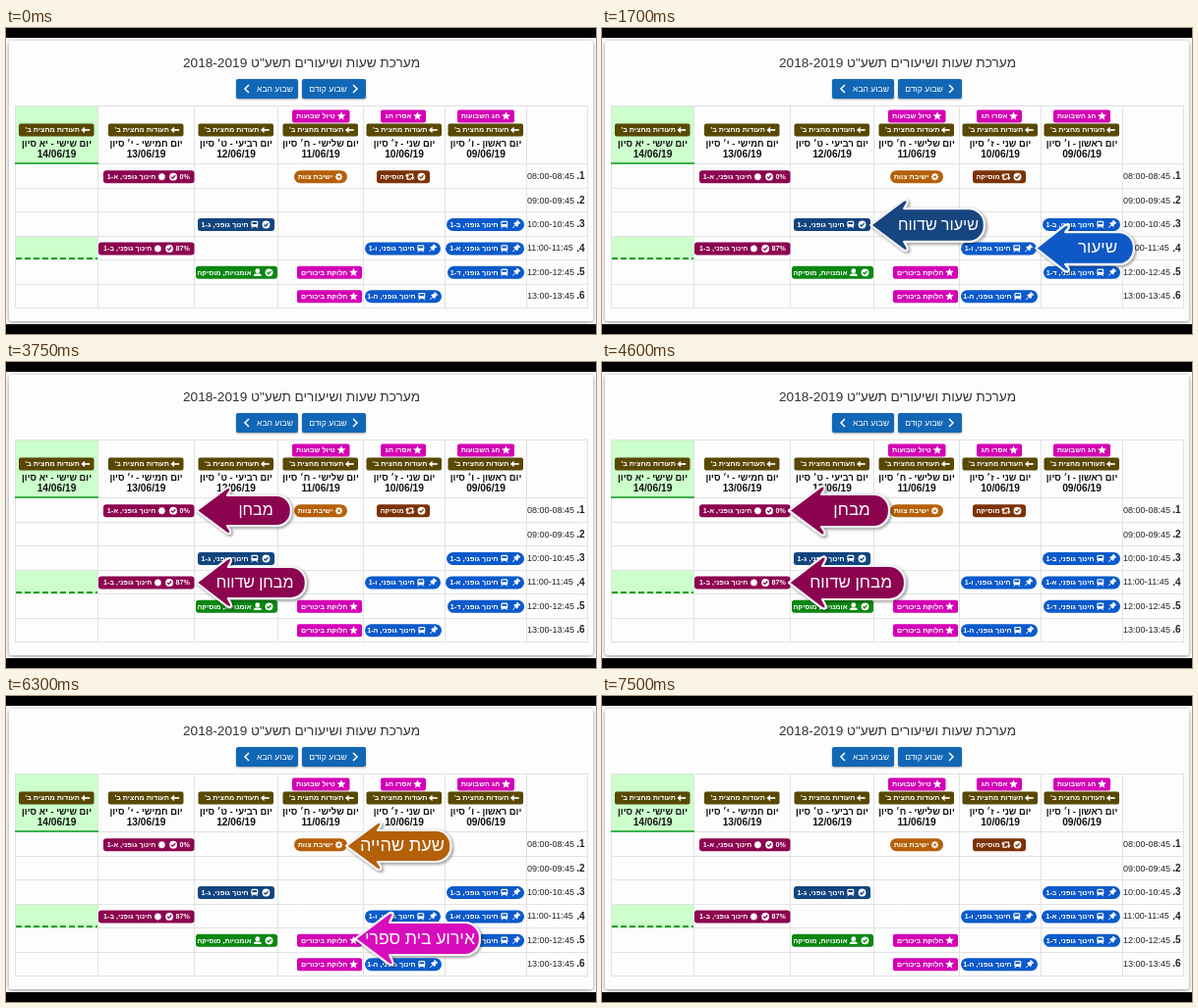
An HTML page with a canvas that plays this animation: 600 px wide and 312 px high, repeating every 8 s.

```html
<!DOCTYPE html>
<html lang="he">
<head>
<meta charset="utf-8">
<title>מערכת שעות</title>
<style>
html, body { margin: 0; width: 100%; height: 100%; overflow: hidden; background: #fff; }
canvas { display: block; width: 600px; height: 312px; }
</style>
</head>
<body>
<canvas id="stage" width="600" height="312"></canvas>
<script>
const ctx = document.getElementById('stage').getContext('2d');
const SANS = '"Liberation Sans", Arial, sans-serif';
const CALLOUT = '"Open Sans", "Liberation Sans", sans-serif';
const LOOP = 8000, STEP = 50, SHOWN = 1650, EXIT = 350;

const BLUE = '#0b5acb', NAVY = '#12457f', PLUM = '#8c0450', PINK = '#d400b5';
const OLIVE = '#594800', ORANGE = '#b56008', RUST = '#7b3206', GREEN = '#0b8712';

const columns = [9.5, 93.5, 191.5, 276.5, 363.5, 446.5, 529.5, 591.5];
const days = [
  ['יום שישי - יא סיון', '14/06/19'],
  ['יום חמישי - י׳ סיון', '13/06/19'],
  ['יום רביעי - ט׳ סיון', '12/06/19'],
  ['יום שלישי - ח׳ סיון', '11/06/19'],
  ['יום שני - ז׳ סיון', '10/06/19'],
  ['יום ראשון - ו׳ סיון', '09/06/19']
];
const hours = ['08:00-08:45', '09:00-09:45', '10:00-10:45', '11:00-11:45', '12:00-12:45', '13:00-13:45'];
const rowLine = i => Math.round(138 + 24.5 * i) + 0.5;
const rowMid = i => 151.7 + 24.4 * i;
const sport = group => 'חינוך גופני, ' + group + '-1';

// left, right, row, colour, corner radius, icons from the right, text
const lessons = [
  [99, 191.5, 0, PLUM, 3, ['0%', 'check', 'burst'], sport('א')],
  [293, 347, 0, ORANGE, 6.5, ['gear'], 'ישיבת צוות'],
  [377, 431, 0, RUST, 3, ['check', 'swap'], 'מוסיקה'],
  [195, 273, 2, NAVY, 3, ['check', 'train'], sport('ג')],
  [448, 527, 2, BLUE, 6.5, ['pin', 'train'], sport('ב')],
  [94, 191.5, 3, PLUM, 3, ['87%', 'check', 'burst'], sport('ב')],
  [365, 442, 3, BLUE, 6.5, ['pin', 'train'], sport('ו')],
  [447, 527, 3, BLUE, 6.5, ['pin', 'train'], sport('א')],
  [193, 276, 4, GREEN, 3, ['check', 'person'], 'אומנויות, מוסיקה'],
  [296, 362, 4, PINK, 2, ['star'], 'חלוקת ביכורים'],
  [449, 527, 4, BLUE, 6.5, ['pin', 'train'], sport('ד')],
  [296, 362, 5, PINK, 2, ['star'], 'חלוקת ביכורים'],
  [365, 443, 5, BLUE, 6.5, ['pin', 'train'], sport('ה')]
];

const scenes = [
  { start: 850, arrows: [
    { tip: 273, neck: 308, right: 389, y: 201, head: 26, body: 17, mid: 342, color: '#17457f', size: 16.2, text: 'שיעור שדווח' },
    { tip: 441, neck: 472, right: 541, y: 224.5, head: 24, body: 16.5, mid: 504, color: '#0f59c6', size: 17, text: 'שיעור' }
  ] },
  { start: 3350, arrows: [
    { tip: 190, neck: 224, right: 292, y: 151.5, head: 25, body: 16.5, mid: 254, color: PLUM, size: 17, text: 'מבחן' },
    { tip: 190, neck: 225, right: 308, y: 225, head: 26.5, body: 17, mid: 253, color: PLUM, size: 17, text: 'מבחן שדווח' }
  ] },
  { start: 5850, arrows: [
    { tip: 344, neck: 378, right: 454, y: 153, head: 25, body: 16.5, mid: 403, color: '#b36007', size: 18.7, text: 'שעת שהייה' },
    { tip: 353, neck: 390, right: 484, y: 247.5, head: 27.5, body: 17, mid: 421, color: '#d80bbd', size: 18.2, text: 'אירוע בית ספרי' }
  ] }
];

function text(str, x, y, font, color, align = 'center', dir = 'rtl') {
  ctx.font = font;
  ctx.fillStyle = color;
  ctx.textAlign = align;
  ctx.direction = dir;
  ctx.textBaseline = 'middle';
  ctx.fillText(str, x, y);
}

function box(x, y, w, h, r, color) {
  ctx.fillStyle = color;
  ctx.beginPath();
  ctx.roundRect(x, y, w, h, r);
  ctx.fill();
}

function line(x1, y1, x2, y2, color, width = 1) {
  ctx.strokeStyle = color;
  ctx.lineWidth = width;
  ctx.beginPath();
  ctx.moveTo(x1, y1);
  ctx.lineTo(x2, y2);
  ctx.stroke();
}

function poly(points, color, close = true) {
  ctx.beginPath();
  points.forEach(([x, y]) => ctx.lineTo(x, y));
  if (close) {
    ctx.fillStyle = color;
    ctx.fill();
  } else {
    ctx.strokeStyle = color;
    ctx.stroke();
  }
}

function dot(x, y, r, color) {
  ctx.fillStyle = color;
  ctx.beginPath();
  ctx.arc(x, y, r, 0, Math.PI * 2);
  ctx.fill();
}

function spikes(count, outer, inner) {
  return Array.from({ length: count * 2 }, (_, i) => {
    const a = i * Math.PI / count - Math.PI / 2, r = i % 2 ? inner : outer;
    return [Math.cos(a) * r, Math.sin(a) * r];
  });
}

const icons = {
  star() { poly(spikes(5, 5, 2.2), '#fff'); },
  burst() { poly(spikes(10, 4.3, 3.2), '#fff'); },
  gear(bg) { poly(spikes(8, 4.5, 3), '#fff'); dot(0, 0, 1.4, bg); },
  check(bg) {
    dot(0, 0, 4.2, '#fff');
    ctx.lineWidth = 1.4;
    poly([[-2.2, 0], [-0.6, 1.6], [2.3, -1.5]], bg, false);
  },
  train(bg) {
    box(-3.7, -4, 7.4, 6.5, 1.5, '#fff');
    box(-2.5, -2.7, 5, 2.2, 0, bg);
    ctx.lineWidth = 1;
    poly([[-3.3, 4], [-1.8, 2]], '#fff', false);
    poly([[3.3, 4], [1.8, 2]], '#fff', false);
  },
  pin() {
    ctx.rotate(Math.PI / 4);
    box(-2.4, -4.8, 4.8, 1.6, 0.5, '#fff');
    poly([[-1.4, -3.4], [1.4, -3.4], [3, 0.8], [-3, 0.8]], '#fff');
    line(0, 0, 0, 5, '#fff');
  },
  person() {
    dot(0, -1.7, 2.6, '#fff');
    box(-4.2, 1.2, 8.4, 2.8, [2, 2, 0, 0], '#fff');
  },
  swap() {
    ctx.lineWidth = 1.4;
    poly([[-3, -1], [-3, 2.7], [1.5, 2.7]], '#fff', false);
    poly([[3, 1], [3, -2.7], [-1.5, -2.7]], '#fff', false);
    poly([[-5.2, -0.6], [-3, -3.6], [-0.8, -0.6]], '#fff');
    poly([[5.2, 0.6], [3, 3.6], [0.8, 0.6]], '#fff');
  },
  left() {
    line(-3, 0, 4.5, 0, '#fff', 1.8);
    poly([[-5, 0], [-1, -3.5], [-1, 3.5]], '#fff');
  }
};

function icon(name, x, y, bg) {
  ctx.save();
  ctx.translate(x, y);
  ctx.scale(0.93, 0.93);
  icons[name](bg);
  ctx.restore();
}

function pill(left, right, y, color, radius, marks, label) {
  const font = 'bold 7.2px ' + SANS;
  box(left, y - 6.5, right - left, 13, radius, color);
  let x = right - 3;
  for (const mark of marks) {
    if (icons[mark]) {
      icon(mark, x - 5.5, y, color);
      x -= 11.7;
    } else {
      text(mark, x - 1.5, y + 0.5, font, '#fff', 'right', 'ltr');
      x -= ctx.measureText(mark).width + 2.5;
    }
  }
  text(label, x, y + 0.5, font, '#fff', 'right');
}

function button(x, width, label, textX, chevronX, dir) {
  ctx.save();
  ctx.shadowColor = 'rgba(0,0,0,.35)';
  ctx.shadowBlur = 2;
  ctx.shadowOffsetY = 1;
  box(x, 52, width, 20, 2, '#1167b5');
  ctx.restore();
  text(label, textX, 62.5, '8.6px ' + SANS, '#fff');
  ctx.lineWidth = 1.5;
  poly([[chevronX - 2 * dir, 58], [chevronX + 2 * dir, 62], [chevronX - 2 * dir, 66]], '#fff', false);
}

function drawPage() {
  ctx.fillStyle = '#fff';
  ctx.fillRect(0, 0, 600, 312);
  ctx.save();
  ctx.shadowColor = 'rgba(0,0,0,.45)';
  ctx.shadowBlur = 4;
  ctx.shadowOffsetY = 1;
  box(3, 13, 594, 286, 3, '#fdfdfd');
  ctx.restore();
  ctx.fillStyle = '#000';
  ctx.fillRect(0, 0, 600, 10);
  ctx.fillRect(0, 302, 600, 10);

  text('מערכת שעות ושיעורים תשע"ט 2018-2019', 300.5, 36.5, '13.65px ' + SANS, '#333');
  button(301, 65, 'שבוע קודם', 327.5, 355, 1);
  button(234, 63, 'שבוע הבא', 273.5, 245, -1);
}

function drawTable() {
  ctx.fillStyle = '#ccffcc';
  ctx.fillRect(10, 80, 83, 58);
  ctx.fillRect(10, rowLine(3), 83, 24);
  columns.forEach(x => line(x, 79, x, 285, '#e2e2e2'));
  line(9, 79.5, 592, 79.5, '#e2e2e2');
  for (let i = 0; i <= 6; i++) line(9, rowLine(i), 592, rowLine(i), '#e2e2e2');
  line(9, 138, 94, 138, '#3cb050', 2);
  ctx.setLineDash([6, 3]);
  line(10, 235, 93, 235, '#10a010', 2);
  ctx.setLineDash([]);

  days.forEach(([name, date], i) => {
    const mid = (columns[i] + columns[i + 1]) / 2;
    pill(mid - 38.5, mid + 38, 104, OLIVE, 2, ['left'], "תעודות מחצית ב'");
    text(name, mid, 118.5, 'bold 9.4px ' + SANS, '#111');
    text(date, mid, 129, 'bold 10.2px ' + SANS, '#111', 'center', 'ltr');
  });
  pill(291, 349.5, 90, PINK, 2, ['star'], 'טיול שבועות');
  pill(381, 427, 90, PINK, 2, ['star'], 'אסרו חג');
  pill(459, 517, 90, PINK, 2, ['star'], 'חג השבועות');

  hours.forEach((hour, i) => {
    text(hour, 530, rowMid(i), '9px ' + SANS, '#222', 'left', 'ltr');
    text(i + 1 + '.', 588.5, rowMid(i), 'bold 10px ' + SANS, '#222', 'right');
  });
  for (const [left, right, row, ...rest] of lessons) pill(left, right, rowMid(row), ...rest);
}

function arrowPath({ tip, neck, right, y, head, body }) {
  ctx.beginPath();
  ctx.moveTo(tip, y);
  ctx.lineTo(neck - 2, y - head + 1);
  ctx.quadraticCurveTo(neck + 4, y - head - 2, neck + 2, y - head + 4);
  ctx.lineTo(neck - 1, y - body);
  ctx.arcTo(right, y - body, right, y, body - 1);
  ctx.arcTo(right, y + body, neck, y + body, body - 1);
  ctx.lineTo(neck - 1, y + body);
  ctx.lineTo(neck + 2, y + head - 4);
  ctx.quadraticCurveTo(neck + 4, y + head + 2, neck - 2, y + head - 1);
  ctx.closePath();
}

function drawArrow(arrow, scale) {
  ctx.save();
  ctx.translate(arrow.mid, arrow.y);
  ctx.scale(scale, scale);
  ctx.translate(-arrow.mid, -arrow.y);
  arrowPath(arrow);
  ctx.lineJoin = 'round';
  ctx.lineWidth = 2.2;
  ctx.strokeStyle = '#f4f4f8';
  ctx.save();
  ctx.shadowColor = 'rgba(0,0,0,.5)';
  ctx.shadowBlur = 3 * scale;
  ctx.shadowOffsetX = ctx.shadowOffsetY = 1.5 * scale;
  ctx.stroke();
  ctx.restore();
  ctx.fillStyle = arrow.color;
  ctx.fill();
  ctx.stroke();
  text(arrow.text, arrow.mid, arrow.y + 0.5, arrow.size + 'px ' + CALLOUT, '#fff');
  ctx.restore();
}

// Springs in, rests, then swells briefly and shrinks away.
function popScale(u) {
  if (u < SHOWN - EXIT) return 1 - 0.88 * Math.exp(-u / 160) * Math.cos(2 * Math.PI * u / 210);
  const v = (SHOWN - u) / EXIT - 1, back = 3.5;
  return Math.max(0, 1 + (back + 1) * v ** 3 + back * v ** 2);
}

function frame(now) {
  const t = Math.floor(now % LOOP / STEP) * STEP;
  drawPage();
  drawTable();
  for (const { start, arrows } of scenes) {
    const u = t - start;
    if (u >= 0 && u < SHOWN) arrows.forEach(arrow => drawArrow(arrow, popScale(u)));
  }
  requestAnimationFrame(frame);
}
frame(performance.now());
</script>
</body>
</html>
```
